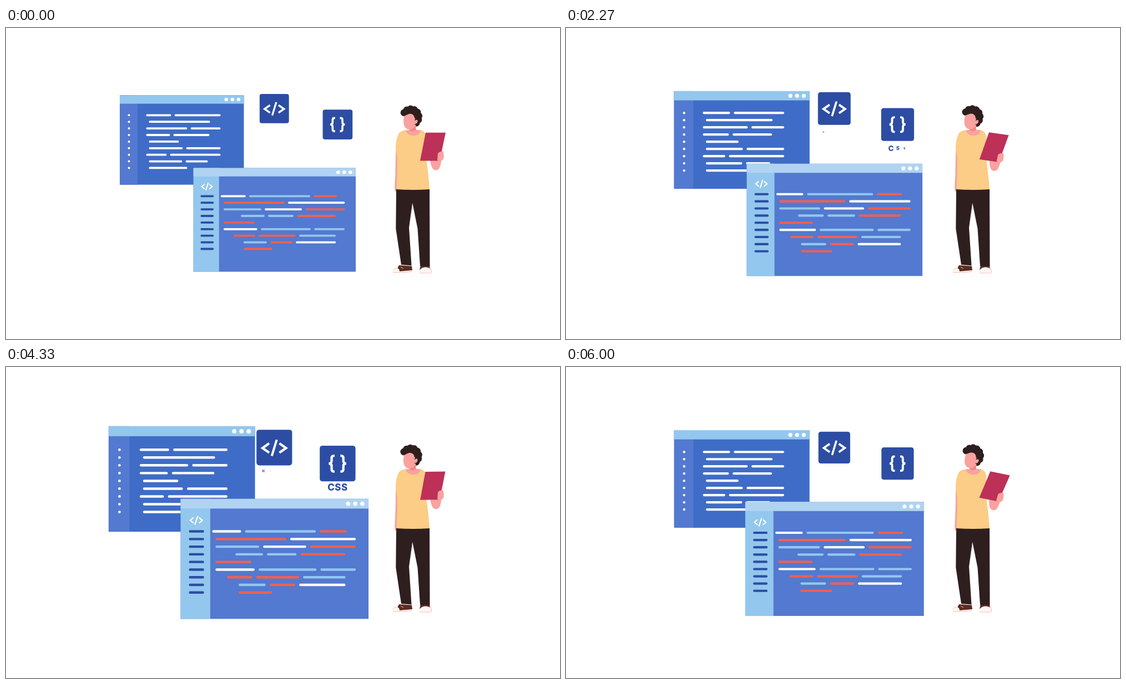
An HTML page with a canvas that plays this animation: 998 by 561 pixels, repeating every 6030 ms.

```html
<!DOCTYPE html>
<html lang="en">
<head>
<meta charset="utf-8">
<title>Coding windows</title>
<style>
html, body { margin: 0; width: 100%; height: 100%; overflow: hidden; background: #fff; }
canvas { display: block; width: 998px; height: 561px; }
</style>
</head>
<body>
<canvas id="stage" width="998" height="561"></canvas>
<script>
const g = document.getElementById('stage').getContext('2d');
const LOOP = 6030;
const WHITE = '#ffffff', NAVY = '#2c4da3', SKY = '#93c7ee', PALE = '#b0d3f2';
const BLUE = '#3f6cc6', MID = '#5379d0', RED = '#f4604f';
const SKIN = '#f9a2a0', SHIRT = '#fbcd86', DARK = '#2e1f1e', CARD = '#bd3058', BROWN = '#5d2b1f';

// Turning points of the pulse, [ms, scale], joined by cosine easing
const beats = [[-700, 0.933], [60, 1.003], [1200, 0.91], [2140, 1.098], [3170, 1.004],
  [4170, 1.193], [5200, 1.004], [6250, 1.107]];
function pulse(t) {
  const i = beats.findIndex(b => b[0] > t);
  const [t0, a] = beats[i - 1], [t1, b] = beats[i];
  return a + (b - a) * (1 - Math.cos(Math.PI * (t - t0) / (t1 - t0))) / 2;
}

// Swing of the board in degrees, starting from rest
function tilt(t) {
  const wave = (1 + Math.cos(2 * Math.PI * (t - 820) / 1293)) / 2;
  return (16.3 * wave ** 1.5 - 4.8) * Math.min(1, t / 250);
}

function box(x, y, r, b, color) {
  g.fillStyle = color;
  g.fillRect(x, y, r - x, b - y);
}
function dot(x, y, r, color) {
  g.fillStyle = color;
  g.beginPath();
  g.arc(x, y, r, 0, 7);
  g.fill();
}
function shape(d, color) {
  g.fillStyle = color;
  g.fill(new Path2D(d));
}
function line(d, width, color, cap = 'butt') {
  g.strokeStyle = color;
  g.lineWidth = width;
  g.lineCap = cap;
  g.stroke(new Path2D(d));
}
function bar(x, y, length, color) {
  line(`M${x} ${y} h${length}`, 3.8, color, 'round');
}
function scaled(x, y, s, draw) {
  g.save();
  g.translate(x, y);
  g.scale(s, s);
  g.translate(-x, -y);
  draw();
  g.restore();
}
function turned(x, y, deg, draw) {
  g.save();
  g.translate(x, y);
  g.rotate(deg * Math.PI / 180);
  g.translate(-x, -y);
  draw();
  g.restore();
}
// Draws a path and its reflection about the vertical line at x
function mirrored(x, d, width) {
  line(d, width, WHITE);
  g.save();
  g.translate(2 * x, 0);
  g.scale(-1, 1);
  line(d, width, WHITE);
  g.restore();
}

// Each row: indent, then words as colour letter and length
const ink = { w: WHITE, b: SKY, r: RED };
const backCode = ['0 w41 w79', '5 w106', '0 w70 w50', '0 w39 w61', '5 w50', '5 w57 w58',
  '0 w33 w87', '5 w56 w36', '5 w65'];
const frontCode = ['0 w41 b106 r38', '5 r106 w98', '5 b64 w63 r67', '36 b39 b42 r66', '5 r52',
  '5 w57 b86 b51', '23 r35 r63 b62', '41 b38 r36 w68', '41 r48'];

function code(rows, left, top, margin) {
  rows.forEach((row, i) => {
    const [indent, ...words] = row.split(' ');
    const y = top + 11.87 * i;
    let x = left + Number(indent);
    margin(y);
    for (const word of words) {
      const length = Number(word.slice(1));
      bar(x, y, length, ink[word[0]]);
      x += length + 10;
    }
  });
}

function panel(x, y, r, b, side, body, strip, top) {
  box(x, y, r, b, body);
  box(x, y, side, b, strip);
  box(x, y, r, y + 15.2, top);
  for (let i = 0; i < 3; i++) dot(r - 9.6 - 11 * i, y + 7.7, 3.3, WHITE);
}
function backWindow() {
  panel(205.2, 121.5, 428.3, 282.5, 237, BLUE, MID, SKY);
  code(backCode, 254.5, 157.4, y => dot(221.7, y, 2, WHITE));
}
function frontWindow() {
  panel(338, 252.7, 629.7, 439.4, 384, MID, SKY, PALE);
  mirrored(362.3, 'M358 281.9 L353 286.2 L358 290.5', 2);
  line('M364.6 279.5 L360.2 293', 2, WHITE);
  code(frontCode, 389, 303.4, y => bar(352.7, y, 19.8, NAVY));
}

function tile(x, y, size) {
  g.fillStyle = NAVY;
  g.beginPath();
  g.roundRect(x - size / 2, y - size / 2, size, size, 4);
  g.fill();
}
function tagIcon() {
  tile(483.3, 145.3, 54);
  mirrored(483.3, 'M475.5 139 L465.5 146 L475.5 153', 3.6);
  line('M487 133.5 L479.5 158', 3.4, WHITE);
}
function braceIcon() {
  tile(597.4, 174.1, 54);
  mirrored(597.2, 'M592.8 162.3 H591.5 Q588.3 162.3 588.3 166 V170 Q588.3 174 584 174 Q588.3 174 588.3 178 V182.5 Q588.3 186.2 591.5 186.2 H592.8', 3.6);
}

// Letters grow one after another, then vanish together
function word(text, x, y, t, start, period, hold) {
  const local = (t - start) % period;
  if (local < 0 || local > hold) return;
  g.fillStyle = NAVY;
  g.font = '800 17px Inter, "Open Sans", sans-serif';
  g.textAlign = 'center';
  const widths = [...text].map(ch => g.measureText(ch).width + 0.5);
  let left = x - widths.reduce((a, b) => a + b) / 2;
  widths.forEach((w, i) => {
    const s = Math.min(1, (local - 140 * i) / 580), mid = left + w / 2;
    if (s > 0.06) scaled(mid, y, s, () => g.fillText(text[i], mid, y + 6.2));
    left += w;
  });
}

function head() {
  for (let a = 212; a <= 408; a += 28) {
    const r = a * Math.PI / 180;
    dot(729.3 + 14.5 * Math.cos(r), 160.5 + 14.5 * Math.sin(r), 6.4, DARK);
  }
  dot(731, 155, 10, DARK);
  shape('M727 176 L738 174 L739 188 L726 188 Z', SKIN);
  shape('M728 183 Q734 181 737.5 176 L738.5 184 Q734 187 728 186 Z', '#f08985');
  shape('M717 159 Q722 156.5 726 155 Q733 154 735.5 160 L736.5 167 Q742 163 741.5 169 Q740 173.5 736.5 173 Q735.5 182.5 727 183.3 Q719 183 716.5 174 Q715.3 166 717 159 Z', SKIN);
}

function board() {
  shape('M764 237 L784 237 Q784 247 780 254 Q774 259 769 254 Q765 249 764 237 Z', SKIN);
  shape('M756 188.8 L792 188.8 L781.3 239.4 L746 239.4 Z', CARD);
  shape('M778 226 Q782 222 787.5 222.5 Q789.5 229 788.5 235 Q786 240 781 241 L777 238.5 Z', SKIN);
}

function shoes() {
  shape('M708 428 L731 429.5 L732 437 Q722 440 705 439 Q704 434 708 428 Z', BROWN);
  shape('M697 440.5 Q697 434 704 433 Q709 434 709 439 L731.5 437 V439.5 Q720 442 697 440.5 Z', '#fff7f5');
  line('M697 440.8 Q715 442 731.5 439.3 M697.3 437 Q698 434 703 433', 0.8, '#e9aaa2');
  line('M711 431 L716 434', 1, '#e8c7b8');
  shape('M747 428 H763 L764.5 436 H745 Z', BROWN);
  shape('M744.5 441.5 Q744.5 433 754 431.5 Q764 431.5 766.8 437 V441.5 Z', '#fff7f5');
  line('M744.8 442 H766.5 M766.6 441 Q767 434 762 432', 0.8, '#e9aaa2');
}

function man(deg) {
  shoes();
  shape('M702 220 L707 220 L704.5 293 Q703 297 700.5 294 Q700 285 701.2 268 L701.8 244 Z', SKIN);
  shape('M703 290 H763 L763.5 429.5 H746 L741.5 362 L732.2 315.5 L726 360 L730.5 428.5 L712 427 L702.3 362 Z', DARK);
  shape('M719 184.5 Q734 183 747 184 Q755 186 757 195 L757.5 238 Q761 265 763 291 Q734 293 703.5 291 Q705 265 705 243 Q705 230 702 222 Q701 205 707 191 Q711 185 719 184.5 Z', SHIRT);
  shape('M720 184.5 Q734 182.5 746.5 184.5 Q746 194 734 194.3 Q722 193.5 720 184.5 Z', SKIN);
  turned(734, 186, deg * 0.57, head);
  turned(763, 230, deg, board);
}

function draw(t) {
  box(0, 0, 998, 561, WHITE);
  scaled(316.8, 202, pulse(t), backWindow);
  scaled(484, 346, pulse(t + 120), frontWindow);
  scaled(483.3, 145.3, pulse(t - 250), tagIcon);
  scaled(597.4, 174.1, pulse(t - 120), braceIcon);
  word('HTML', 483, 188, t, 190, 1975, 1400);
  word('CSS', 597.2, 217, t, 290, 1525, 1125);
  man(tilt(t));
}

function tick() {
  draw(performance.now() % LOOP);
  requestAnimationFrame(tick);
}
tick();
</script>
</body>
</html>
```
